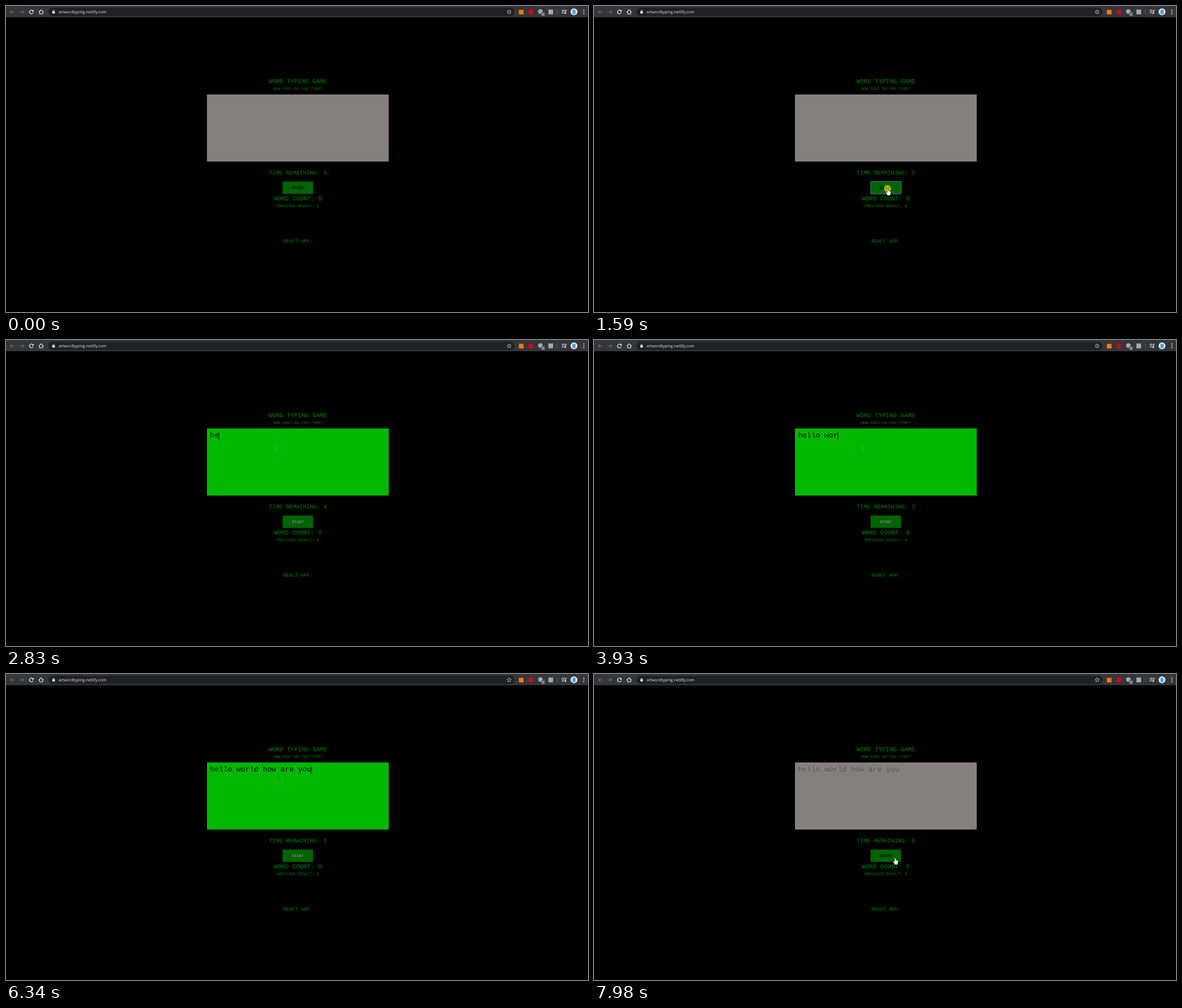
Recreate the animation shown at these times as an HTML page with a canvas. Size 1031x543 px, loop 8 s.

```html
<!DOCTYPE html>
<html lang="en">
<head>
<meta charset="utf-8">
<title>Word typing game</title>
<style>
html, body { margin: 0; width: 100%; height: 100%; overflow: hidden; background: #000; }
canvas { display: block; width: 1031px; height: 543px; }
</style>
</head>
<body>
<canvas id="stage" width="1031" height="543"></canvas>
<script>
const ctx = document.getElementById('stage').getContext('2d');
const LOOP = 8000, START = 1680, END = 6660;
const MONO = '"Liberation Mono", monospace';
const SANS = '"Open Sans", sans-serif';
const AREA = { x: 356, y: 157, w: 322, h: 119 };
const BUTTON = { x: 490, y: 311.6, w: 54, h: 22 };
const PHRASE = 'hello world how are you';

// Moment at which each character of the phrase is typed.
const KEYS = [2750, 2830, 3060, 3230, 3380, 3530, 3680, 3760, 3930, 4010, 4160, 4310,
  4620, 4850, 4850, 4930, 5080, 5250, 5320, 5790, 6020, 6190, 6340];
const TICKS = [2680, 3600, 4620, 5640, END];

// Pointer strokes: first and last moment, number of steps, points passed.
const STROKES = [
  { from: 70, to: 500, steps: 7, path: [[904, 491], [460.5, 194.5]] },
  { from: 900, to: 1360, steps: 7, path: [[460.5, 194.5], [524, 332.5], [520.5, 324]] },
  { from: 1680, to: 1900, steps: 4, path: [[520.5, 324], [478, 192]] },
  { from: 7590, to: 7980, steps: 6, path: [[477, 191.5], [533.5, 326]] }
];

const countPassed = (times, t) => times.filter(x => x <= t).length;
const inside = (r, x, y) => x >= r.x && x <= r.x + r.w && y >= r.y && y <= r.y + r.h;
const smooth = u => u * u * (3 - 2 * u);

function text(str, x, y, size, color, { font = MONO, align = 'center', weight = '' } = {}) {
  ctx.font = `${weight} ${size}px ${font}`;
  ctx.textRendering = 'geometricPrecision';
  ctx.textAlign = align;
  ctx.fillStyle = color;
  ctx.fillText(str, x, y);
}

function rect(x, y, w, h, color, radius = 0) {
  ctx.fillStyle = color;
  ctx.beginPath();
  ctx.roundRect(x, y, w, h, radius);
  ctx.fill();
}

function dot(x, y, r, color) {
  ctx.fillStyle = color;
  ctx.beginPath();
  ctx.arc(x, y, r, 0, Math.PI * 2);
  ctx.fill();
}

function line(points, color, width = 1) {
  ctx.strokeStyle = color;
  ctx.lineWidth = width;
  ctx.beginPath();
  points.forEach(([x, y]) => ctx.lineTo(x, y));
  ctx.stroke();
}

function outlined(d, x, y) {
  const shape = new Path2D(d);
  ctx.save();
  ctx.translate(x, y);
  ctx.lineJoin = 'round';
  ctx.strokeStyle = '#000';
  ctx.lineWidth = 1.2;
  ctx.stroke(shape);
  ctx.fillStyle = '#fff';
  ctx.fill(shape);
  ctx.restore();
}

function navArrow(x, dir) {
  const color = '#77787b';
  line([[x - 4 * dir, 10.5], [x + 3.6 * dir, 10.5]], color);
  line([[x, 6.8], [x + 3.7 * dir, 10.5], [x, 14.2]], color);
}

function star(x, y) {
  const points = Array.from({ length: 11 }, (_, i) => {
    const r = i % 2 ? 1.8 : 4, a = i * Math.PI / 5;
    return [x + r * Math.sin(a), y - r * Math.cos(a)];
  });
  line(points, '#d4d5d7', 0.8);
}

function drawToolbar() {
  const light = '#eceded';
  rect(0, 0, 1031, 20, '#35363a');
  rect(75, 2.8, 826, 15, '#202124', 7.5);
  navArrow(11, -1);
  navArrow(28, 1);

  ctx.strokeStyle = light;
  ctx.lineWidth = 1.2;
  ctx.beginPath();
  ctx.arc(45, 10.5, 3.3, 0.4, 5.4);
  ctx.stroke();
  ctx.fillStyle = light;
  ctx.fill(new Path2D('M49 6.4V10H45.4Z'));
  line([[58, 10.8], [62.3, 6.8], [66.6, 10.8]], light, 1.1);
  line([[59.6, 10], [59.6, 14], [65, 14], [65, 10]], light, 1.1);

  rect(82, 9.3, 4.6, 4, light, 0.5);
  ctx.beginPath();
  ctx.arc(84.3, 8.8, 1.4, Math.PI, 0);
  ctx.lineWidth = 0.8;
  ctx.strokeStyle = light;
  ctx.stroke();
  text('artwordtyping.netlify.com', 93, 13, 7.1, '#e6e7e9', { font: SANS, align: 'left' });
  star(891.3, 10.6);

  rect(908.5, 6.8, 8.4, 8.2, '#ee7611', 1);
  dot(930, 10.6, 4.6, '#c9091b');
  dot(946.6, 9.8, 4.1, '#a5a7b0');
  rect(948, 11.2, 6.8, 6.6, '#62646d', 1.2);
  text('0', 951.4, 16.8, 5.6, '#fff', { font: SANS });
  rect(960.8, 6.2, 8.3, 8.6, '#a7a8a9', 0.5);
  rect(976.2, 6, 0.8, 9, '#606165');

  [7.5, 10, 12.5].forEach((y, i) => rect(984.5, y - 0.5, i === 2 ? 3.4 : 5.6, 1, light));
  rect(991, 7, 1, 6, light);
  rect(991, 7, 2.4, 1, light);
  dot(990.5, 12.8, 1.4, light);

  dot(1006.2, 10.3, 6.1, '#dfebf3');
  rect(1003.4, 6.2, 5.6, 8.5, '#45a2dc', 2.7);
  [7, 10.4, 13.8].forEach(y => dot(1023.6, y, 0.95, light));
}

function drawGame(t) {
  const green = '#008000';
  const running = t >= START && t < END;
  const done = t >= END;
  const score = done ? 5 : 0;
  const typed = countPassed(KEYS, t);

  text('WORD TYPING GAME', 517, 136.7, 10.83, green);
  text('HOW FAST DO YOU TYPE?', 517, 148.5, 7, green);

  rect(AREA.x, AREA.y, AREA.w, AREA.h, running ? '#00b800' : '#858080');
  line([[674, 275.2], [677.2, 272]], '#555', 0.5);
  line([[676, 275.2], [677.2, 274]], '#555', 0.5);
  text(PHRASE.slice(0, typed), 361.5, 173.4, 13, running ? '#000' : '#545454', { align: 'left' });
  const caretOn = typed > 0 || t < 2220;
  if (running && caretOn) rect(361.4 + typed * 7.8, 163, 0.9, 15, '#000');

  text(`TIME REMAINING: ${5 - countPassed(TICKS, t)}`, 517, 299.2, 10.1, green);
  rect(BUTTON.x, BUTTON.y, BUTTON.w, BUTTON.h, '#006400');
  if (t >= 1590 && t < START) {
    ctx.strokeStyle = '#3c78a0';
    ctx.lineWidth = 1;
    ctx.strokeRect(490, 311.5, 54.2, 22.2);
  }
  text('START', 517, 324.7, 7.16, running ? '#808080' : '#000', { weight: 'bold' });
  text(`WORD COUNT: ${score}`, 517, 345.4, 10.83, green);
  text(`PREVIOUS RESULT: ${score}`, 517, 357.3, 7, green);
  text('REACT APP.', 517, 420.4, 8.6, green);
}

function pointerAt(t) {
  const stroke = STROKES.filter(s => s.from <= t).pop();
  if (!stroke) return null;
  const { from, to, steps, path } = stroke;
  const step = Math.min(steps - 1, Math.floor((t - from) / (to - from) * (steps - 1) + 0.05));
  const u = step / (steps - 1);
  if (path.length === 3 && step === steps - 1) return path[2];
  const v = path.length === 3 ? smooth(step / (steps - 2)) : smooth(u);
  return path[0].map((a, i) => a + (path[1][i] - a) * v);
}

function drawForbidden(x, y) {
  dot(x, y, 4.7, '#fff');
  ctx.strokeStyle = '#d00010';
  ctx.lineWidth = 1.3;
  ctx.beginPath();
  ctx.arc(x, y, 3.7, 0, Math.PI * 2);
  ctx.stroke();
  line([[x - 2.6, y - 2.6], [x + 2.6, y + 2.6]], '#d00010', 1.4);
}

function drawBeam(x, y) {
  const gray = '#6b8b6b';
  rect(x - 0.6, y - 4.5, 1.2, 9, gray);
  rect(x - 1.8, y - 5, 3.6, 1, gray);
  rect(x - 1.8, y + 4, 3.6, 1, gray);
}

function drawPointer(t) {
  const point = pointerAt(t);
  if (!point) return;
  const [x, y] = point;
  const running = t >= START && t < END;
  if (t >= 1590 && t < START) dot(520, 324, 6.4, 'rgba(205, 205, 0, 0.8)');
  if (inside(AREA, x, y)) {
    if (running) drawBeam(x, y);
    else drawForbidden(t >= END ? 476.5 + (x - 477) : x, y);
    if (t >= END && t < 7590) return;
  } else if (inside(BUTTON, x, y)) {
    if (running) drawForbidden(x - 0.5, y);
    else outlined('M-.9 .9Q0-.4.9.9V4.3L4 5Q5.3 5.3 5.2 6.7L4.6 9.6 3.9 12H-.7L-1.3 10.4-3.4 7.4Q-3.6 6-2.3 6.4L-.9 7.5Z', x, y);
  } else {
    outlined('M0 0V9.2L2.1 7.3 3.5 10.5 4.9 9.9 3.5 6.8H6.4Z', x, y);
  }
}

function frame(now) {
  const t = now % LOOP;
  rect(0, 0, 1031, 543, '#000');
  drawToolbar();
  drawGame(t);
  drawPointer(t);
  requestAnimationFrame(frame);
}
requestAnimationFrame(frame);
</script>
</body>
</html>
```
